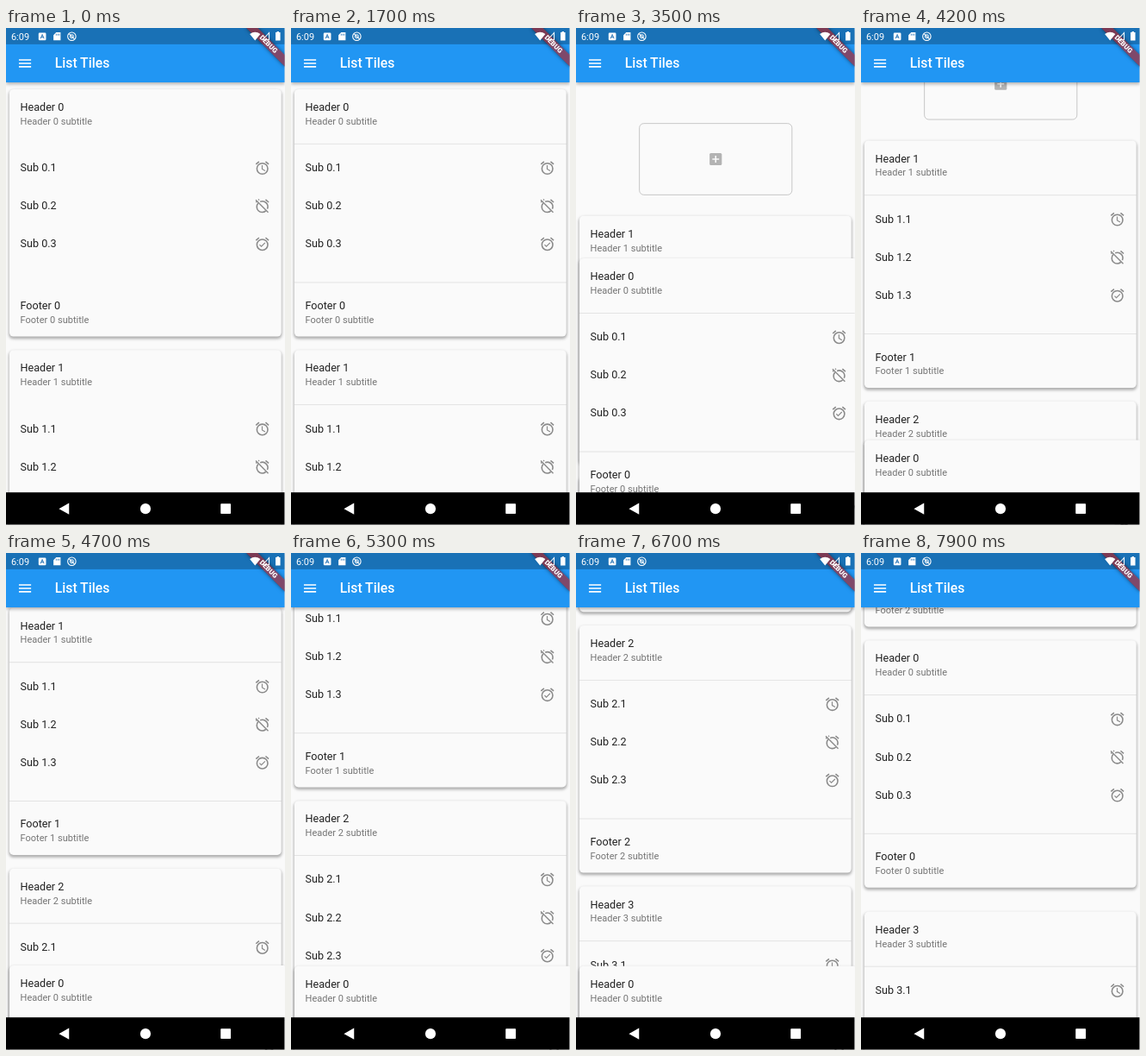
Write an HTML page that moves like this. It is 324 by 576 pixels and loops after 8000 ms.

```html
<!DOCTYPE html>
<html lang="en">
<head>
<meta charset="utf-8">
<title>List Tiles</title>
<style>
html, body { margin: 0; width: 100%; height: 100%; overflow: hidden; background: #fafafa; }
/* laid out in 411.43 x 731.43 units, scaled to 324 x 576 */
#stage { position: absolute; width: 411.43px; height: 731.43px; overflow: hidden; background: #fafafa;
  transform: scale(.7875); transform-origin: 0 0; font: 16px/20px Roboto, sans-serif; color: #222; }
#stage div, #stage svg { position: absolute; }
.card { left: 5px; top: 0; width: 401.43px; height: 364px; border-radius: 6px; background: #fafafa;
  box-shadow: 0 2.5px 4px 1px rgba(0,0,0,.3); white-space: nowrap; }
.card.lifted { width: 411.43px; z-index: 2; }
.card div { left: 16px; }
.card .small { font-size: 14px; color: #757575; }
.card .line { left: 0; width: 100%; height: 1px; background: rgba(0,0,0,.12); opacity: var(--line); }
.card svg { right: 16px; width: 24px; height: 24px; fill: none; stroke: #8b8b8b; stroke-width: 2; }
#ghost { left: 0; top: 0; width: 100%; overflow: hidden; }
#box { left: 92.7px; top: 50px; width: 224px; height: 104.4px; border: 1px solid #b9b9b9; border-radius: 7px; }
#box svg { left: 100px; top: 40px; }
#bar { z-index: 3; width: 100%; height: 80px; background: #2196f3; box-shadow: 0 2px 5px rgba(0,0,0,.3); }
#title { left: 72px; top: 42px; font-size: 20px; font-weight: 500; color: #fff; }
#status { z-index: 4; width: 100%; height: 24px; background: rgba(0,0,0,.25); }
#corner { z-index: 4; left: 100%; top: 0; transform: rotate(45deg); transform-origin: 0 0; }
#corner div { left: -40px; top: 28px; width: 80px; height: 12px; background: rgba(183,28,28,.63);
  box-shadow: 0 0 6px rgba(0,0,0,.5); color: #fff; font-size: 10.2px; line-height: 12px; font-weight: 900; text-align: center; }
#chrome { z-index: 5; left: 0; top: 0; fill: #fff; }
</style>
</head>
<body>
<div id="stage">
  <div id="ghost"><div id="box">
    <svg width="24" height="24"><rect x="3" y="3" width="18" height="18" rx="2" fill="#b3b3b3"/><path d="M12 7v10M7 12h10" stroke="#fafafa" stroke-width="2"/></svg>
  </div></div>
  <div id="bar"><div id="title">List Tiles</div></div>
  <div id="status"></div>
  <div id="corner"><div>DEBUG</div></div>
  <svg id="chrome" width="411.43" height="731.43">
    <text x="7.5" y="17.2" font-size="14">6:09</text>
    <rect x="48" y="7" width="11" height="11" rx="1.5"/>
    <path d="M51 15.5l2.5-6 2.5 6M52 13.5h3" fill="none" stroke="#2372b5" stroke-width="1.2"/>
    <path d="M74 6.5h6.5v11.5h-10.5v-7.5z"/>
    <path d="M74 8.5v2.5M76.3 8.5v2.5M78.5 8.5v2.5" stroke="#2372b5"/>
    <circle cx="97" cy="12.3" r="6" fill="none" stroke="#fff" stroke-width="1.4"/>
    <circle cx="97" cy="12.3" r="2.5" fill="none" stroke="#fff" stroke-width="1.3"/>
    <path d="M93 8.3l8 8" stroke="#fff" stroke-width="1.3"/>
    <path d="M359.5 9q7.8-6 15.6 0l-7.8 9.5z"/>
    <path d="M388 7v10.5h-9.5z" fill="none" stroke="#fff" stroke-width="1.3"/>
    <path d="M397.5 6.5h2v-1.5h3v1.5h2v12h-7z"/>
    <path d="M19 46h18v2h-18zm0 5h18v2h-18zm0 5h18v2h-18z"/>
    <rect y="683.43" width="412" height="48" fill="#000"/>
    <path d="M93 699v17l-15-8.5z"/>
    <circle cx="205.7" cy="707.5" r="7.7"/>
    <rect x="316.5" y="700" width="15" height="15" rx="1"/>
  </svg>
</div>
<script>
const $ = id => document.getElementById(id);
const ears = '<path d="M2.6 6.5l4.6-3.9M21.4 6.5l-4.6-3.9"/><circle cx="12" cy="13" r="8"/>';
const icons = [
  ears + '<path stroke-width="1.5" d="M11.75 8v5.6l4.4 2.6"/>',
  '<path d="M8.84 5.67A8 8 0 0 1 19.35 16.15M5.9 7.8A8 8 0 0 0 17.2 19.1M21.4 6.5l-4.6-3.9M2.6 6.5l1.5-1.2M6.2 3.3l1.2-1"/><path stroke-width="1.8" d="M2.3 2.9L20.7 21.4"/>',
  ears + '<path stroke-width="1.5" d="M7.9 12.9l2.65 2.65 5.5-5.45"/>'
];

const at = (top, content, cls = '') => `<div class="${cls}" style="top:${top}px">${content}</div>`;
const heading = (top, text) => at(top + 16.5, text) + at(top + 37.2, text + ' subtitle', 'small');

function makeCard(n) {
  const card = document.createElement('div');
  card.className = 'card';
  card.innerHTML = heading(0, 'Header ' + n) + at(80, '', 'line') +
    icons.map((icon, i) => at(106 + 56 * i, `Sub ${n}.${i + 1}`) +
      `<svg viewBox="0 0 24 24" style="top:${104 + 56 * i}px">${icon}</svg>`).join('') +
    at(284, '', 'line') + heading(292, 'Footer ' + n);
  $('stage').insertBefore(card, $('bar'));
  return card;
}
const cards = [0, 1, 2, 3].map(makeCard);

const ramp = (t, a, b) => Math.min(1, Math.max(0, (t - a) / (b - a)));
// piecewise linear path through [time, value] points
const track = (t, keys) => keys.reduce((v, [time, value], i) =>
  i ? v + (value - keys[i - 1][1]) * ramp(t, keys[i - 1][0], time) : value, 0);
const moveTo = (el, y) => el.style.transform = `translateY(${y}px)`;

const LOOP = 8000, LIFT = 2550, SWITCH = 7000, DROP = 7624, PITCH = 384, SLOT = 186.4;
const scrollKeys = [[3550, 0], [4700, 195.8], [5300, 295.6], [6100, 439.4], [DROP, 729.5]];
const dragKeys = [[LIFT, 90], [2800, 104], [3500, 338.4], [3900, 590], [4200, 606.5],
  [5300, 607.9], [7250, 607.9], [DROP, 400]];

function draw() {
  const t = performance.now() % LOOP;
  const lifted = t >= LIFT && t < DROP;
  const order = t < LIFT ? [0, 1, 2, 3] : lifted ? [1, 2, 3] : [1, 2, 0, 3];
  const swap = ramp(t, SWITCH, SWITCH + 300);
  const gaps = {
    1: SLOT * (ramp(t, LIFT + 50, LIFT + 350) - swap),
    3: SLOT * (swap - ramp(t, DROP, DROP + 302))
  };
  const ghostBefore = t < SWITCH ? 1 : 3;

  let y = 90 - track(t, scrollKeys);
  for (const id of order) {
    const gap = gaps[id] || 0;
    if (id === ghostBefore) {
      moveTo($('ghost'), y);
      $('ghost').style.height = gap + 'px';
    }
    y += gap;
    moveTo(cards[id], y);
    y += PITCH;
  }
  if (lifted) moveTo(cards[0], track(t, dragKeys));
  cards[0].classList.toggle('lifted', lifted);
  $('ghost').style.visibility = lifted ? 'visible' : 'hidden';
  $('stage').style.setProperty('--line', ramp(t, 0, 900));
  requestAnimationFrame(draw);
}
draw();
</script>
</body>
</html>
```
